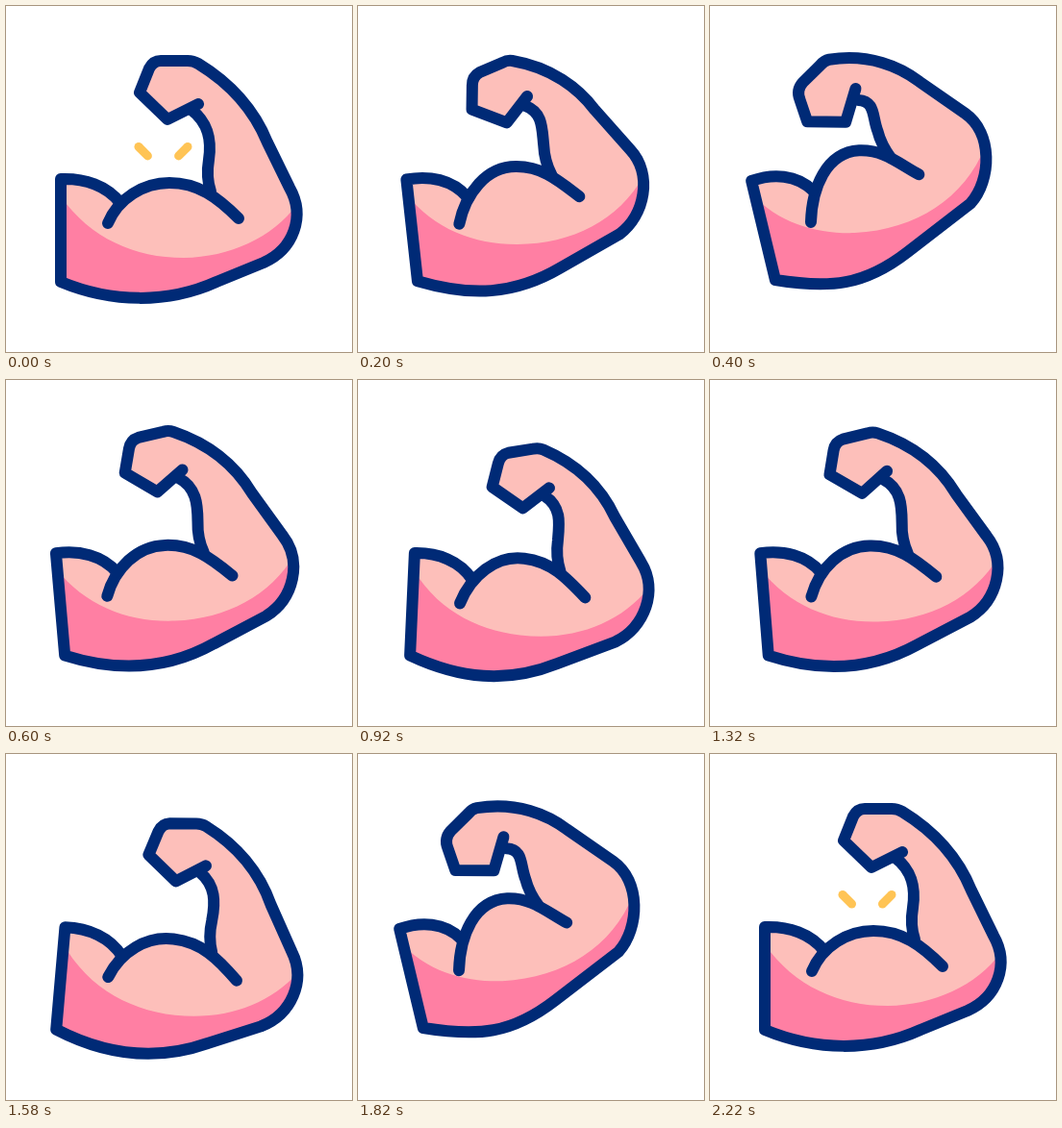
These frames come from a looping animation (360 by 360 pixels, 2.4 s). An HTML page:

```html
<!DOCTYPE html>
<html>
<head>
<meta charset="utf-8">
<title>Flexing arm</title>
<style>
  html, body { margin: 0; width: 100%; height: 100%; overflow: hidden; background: #fff; }
  svg { display: block; width: 100%; height: 100%; }
  .line { fill: none; stroke: #002a76; stroke-width: 12; stroke-linecap: round; stroke-linejoin: round; }
  .spark { stroke: #ffc455; stroke-width: 9; stroke-linecap: round; }
</style>
</head>
<body>
<svg viewBox="0 0 360 360">
  <clipPath id="clip"><path id="body"/></clipPath>
  <g id="arm">
    <g clip-path="url(#clip)">
      <rect x="-50" y="-50" width="460" height="460" fill="#fdbfba"/>
      <path id="shade" fill="#ff7fa3"/>
    </g>
    <path id="inner" class="line"/>
    <path id="biceps" class="line"/>
    <path id="outline" class="line"/>
  </g>
  <g id="sparks"><line class="spark"/><line class="spark"/></g>
</svg>
<script>
const LOOP = 2400, TILT = -13.5, SHOULDER = [57, 234];
const el = id => document.getElementById(id);

// Each shape: relaxed pose, then fully flexed pose (seen at TILT degrees)
const outline = [
  'M200,102 L168,118 L139,90 L149,65 Q153,57 161,57 L189,57 Q195,57 200,60 C236,82 259,110 272,142 L295,189 C312,219 299,253 268,267 L219,287 C168,310 110,309 57,287 L57,180 C82,179 105,187 119,205',
  'M151,86 L141,121 L101,121 L93,98 Q89,88 96,80 L114,62 Q118,57 123,56 C165,49 197,63 217,78 L265,111 C294,131 293,180 271,205 L205,256 C160,291 125,294 68,285 L43,182 C65,174 90,175 107,192'
];
const shapes = {
  outline,
  body: [
    outline[0] + ' C133,191 150,185 170,185 C190,185 203,190 213,193 C210,184 209,172 211,160 C214,140 211,122 193,108 Z',
    outline[1] + ' C112,168 128,152 155,151 C168,151 178,153 188,158 C182,150 177,142 174,130 C168,115 172,99 154,98 Z'
  ],
  biceps: [
    'M106,226 C117,200 143,184 170,184 C200,184 220,199 242,221',
    'M105,225 C106,190 120,152 155,150 C180,149 195,163 217,175'
  ],
  inner: [
    'M193,108 C211,122 214,140 211,160 C209,172 210,184 213,193',
    'M154,98 C172,99 168,115 174,130 C177,142 182,150 188,158'
  ],
  shade: [
    'M50,187 C80,238 130,262 185,262 C235,261 280,240 306,202 L340,340 L30,340 Z',
    'M40,192 C70,226 110,237 150,236 C215,232 264,200 286,146 L360,290 L60,350 Z'
  ]
};

function untilt([x, y]) {
  const a = -TILT * Math.PI / 180, dx = x - SHOULDER[0], dy = y - SHOULDER[1];
  return [
    SHOULDER[0] + dx * Math.cos(a) - dy * Math.sin(a),
    SHOULDER[1] + dx * Math.sin(a) + dy * Math.cos(a)
  ];
}

const PAIR = /(\d+),(\d+)/g;
const points = d => [...d.matchAll(PAIR)].map(m => [+m[1], +m[2]]);
const morphs = Object.entries(shapes).map(([id, [rest, flexed]]) =>
  ({ node: el(id), rest, from: points(rest), to: points(flexed).map(untilt) }));

const clamp = v => Math.min(1, Math.max(0, v));

// Sine-eased track through [time, value] keys
function track(keys, t) {
  const i = keys.findIndex(k => k[0] > t);
  if (i < 0) return keys[keys.length - 1][1];
  const [t0, a] = keys[i - 1], [t1, b] = keys[i];
  return a + (b - a) * (1 - Math.cos(Math.PI * (t - t0) / (t1 - t0))) / 2;
}

const bendKeys = [[0, 0], [372, 1], [752, -.08], [1118, 1], [1465, -.08], [1830, 1], [2090, 0]];
const tiltKeys = [[0, 0], [425, TILT], [818, 7], [1155, TILT], [1515, 7], [1840, TILT], [2220, 0]];

function drawSparks(t) {
  const size = t < 1000 ? 1 - clamp(t / 80) : clamp((t - 2120) / 80);
  el('sparks').style.display = size ? '' : 'none';
  [[138, 1], [189, -1]].forEach(([x, dir], i) => {
    const line = el('sparks').children[i];
    line.setAttribute('x1', x);
    line.setAttribute('y1', 146.5);
    line.setAttribute('x2', x + dir * 9.5 * size);
    line.setAttribute('y2', 146.5 + 9.5 * size);
  });
}

function draw(now) {
  const t = now % LOOP, bend = track(bendKeys, t);
  for (const { node, rest, from, to } of morphs) {
    let i = 0;
    node.setAttribute('d', rest.replace(PAIR, () => {
      const p = from[i], q = to[i++];
      return p.map((v, k) => (v + (q[k] - v) * bend).toFixed(2)).join();
    }));
  }
  el('arm').setAttribute('transform', `rotate(${track(tiltKeys, t)} ${SHOULDER})`);
  drawSparks(t);
}

const start = performance.now();
function frame() {
  draw(performance.now() - start);
  requestAnimationFrame(frame);
}
frame();
</script>
</body>
</html>
```
